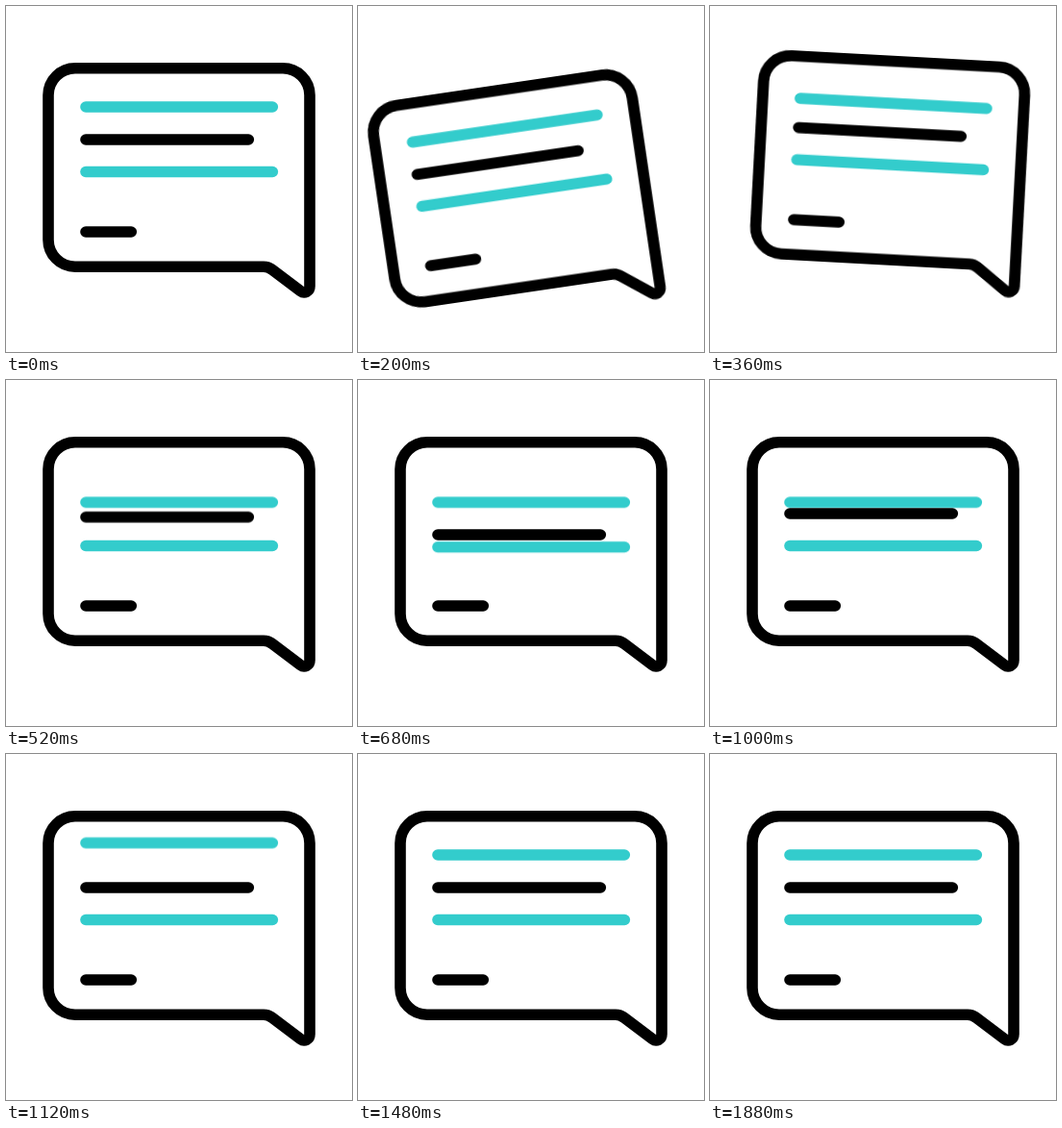
Animation, 360 px wide and 360 px high, one loop 2000 ms. Source, as an HTML page:

```html
<!DOCTYPE html>
<html lang="en">
<head>
<meta charset="utf-8">
<title>Speech bubble</title>
<style>
  html, body { margin: 0; width: 100%; height: 100%; overflow: hidden; background: #fff; }
  svg { display: block; width: 100vw; height: 100vh; }
  path {
    fill: none; stroke: #000; stroke-width: 11.6;
    stroke-linecap: round; stroke-linejoin: round;
  }
  .teal { stroke: #33cccc; }
  #bubble, .top, .mid, .low { animation: 2s cubic-bezier(.33, 0, .67, 1) infinite; }
  #bubble { transform-origin: 319.6px 303px; animation-name: rock; }
  .top { animation-name: top; }
  .mid { animation-name: mid; }
  .low { animation-name: low; }

  @keyframes rock {
    0%, 4% { transform: rotate(0deg); }
    12.1% { transform: rotate(-10deg); }
    19.75% { transform: rotate(5deg); }
    25%, 100% { transform: rotate(0deg); }
  }
  /* Each line knocks the next one down, then the push travels back up. */
  @keyframes top {
    0%, 16% { transform: translateY(0); }
    24%, 50% { transform: translateY(22.3px); }
    56% { transform: translateY(-12.5px); }
    64%, 100% { transform: translateY(0); }
  }
  @keyframes mid {
    0%, 24% { transform: translateY(0); }
    32%, 46% { transform: translateY(22px); }
    50%, 100% { transform: translateY(0); }
  }
  @keyframes low {
    0%, 32% { transform: translateY(0); }
    42% { transform: translateY(11.8px); }
    46%, 100% { transform: translateY(0); }
  }
</style>
</head>
<body>
<svg viewBox="0 0 360 360">
  <g id="bubble">
    <path d="M72 64.8H288A28 28 0 0 1 316 92.8V291.5C316 297 310.5 299.6 306.5 296.6L277 274.4Q273 271.2 268 271.2H72A28 28 0 0 1 44 243.2V92.8A28 28 0 0 1 72 64.8Z"/>
    <path class="teal top" d="M83 105H277.3"/>
    <path class="mid" d="M83 139H252.3"/>
    <path class="teal low" d="M83 172.5H277.3"/>
    <path d="M83 235H130.3"/>
  </g>
</svg>
</body>
</html>
```
